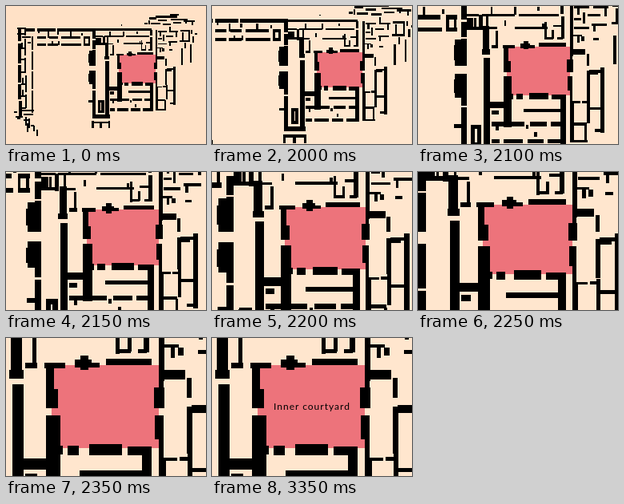
These frames come from a looping animation (250x173 px, 5350 ms). An HTML page:

```html
<!DOCTYPE html>
<html lang="en">
<head>
<meta charset="utf-8">
<title>Palace plan</title>
<style>
  @property --k { syntax: "<number>"; inherits: true; initial-value: 0; }
  @property --dx { syntax: "<length>"; inherits: true; initial-value: 0px; }

  html, body { margin: 0; width: 100%; height: 100%; overflow: hidden; }
  svg {
    display: block; width: 100vw; height: 100vh;
    background: #ffe6ce;
    animation: zoom 5350ms infinite step-end;
  }
  /* k counts the eight equal zoom steps */
  .plan {
    transform:
      translate(calc(var(--k) * -43.9px + var(--dx)), calc(var(--k) * -18px))
      scale(calc(1 + var(--k) * .24));
  }
  .walls { fill: none; stroke: #000; }
  .label {
    font: 12px Lato, "Open Sans", sans-serif;
    letter-spacing: 1px;
    animation: label 5350ms infinite step-end;
  }
  @keyframes zoom {
    0% { --k: 0; --dx: 0px; background: #ffe1c6; }
    37.383% { --k: 1; --dx: 0px; background: #ffe6ce; animation-timing-function: steps(7); }
    43.924% { --k: 8; --dx: 0px; background: #ffe6ce; animation-timing-function: step-end; }
    43.925%, 100% { --k: 8; --dx: -4px; background: #ffe6ce; }
  }
  @keyframes label {
    0% { visibility: hidden; }
    62.616%, 100% { visibility: visible; }
  }
</style>
</head>
<body>
<svg viewBox="0 0 250 173" preserveAspectRatio="none">
  <g class="plan" shape-rendering="crispEdges">

    <!-- west wing -->
    <g class="walls">
      <path stroke-width="4" d="M17 27V44M17 47V72M17 74V96M17 98V117M17.500 119V138"/>
      <path stroke-width="2" d="M14 28H25M14 35H24M24 29V37M24 41V62M24 65V84M25 87V108M25 111V128
        M33 38V55M33 57V80M33 82V104M33 106V134M20 39H31M19 53H24M19 67H24M19 83H25M19 98H25M19 113H25
        M19 128H25M27 46H31M20 46V53M21 90V98M21 105V113"/>
      <path stroke-width="2" d="M10 133H14M12 139H21M19 131H35M22 136H34M25 139V150M22 143H30M29 141V153
        M27 147V158M31 150H35M35 150V157M39 155V163M14 141H18"/>
    </g>

    <!-- north rooms -->
    <g class="walls">
      <path stroke-width="4" d="M23 29.500H36M39 29.500H62M64 29.500H112"/>
      <path stroke-width="3" d="M112 29.500H182"/>
      <path stroke-width="3" d="M39 39.500H50M54 39.500H65M69 39.500H93M97 39.500H105
        M39 48.500H50M52 48.500H65M69 48.500H94M97 48.500H105"/>
      <path stroke-width="2" d="M41 31V34M53 32V40M65 32V36M66 44V49M81 32V38M95 34V37M98 39V49M103.500 39V49M58 44V48"/>
      <path stroke-width="1.600" d="M112 38H121M123 38H147M150 38H179M130 32V37M147 32V38M164 32V35
        M118 40V48M113 40V47M127 39V56M127 47.500H134M147 47.200H171M140 42V46
        M169.500 43V56M174.500 49V55M169 55H175M167.500 44V47M175 46H181M178 55H182"/>
      <path stroke-width="2.400" d="M181.400 30V37M181.600 39V55.500M109 47.500H122"/>
      <path fill="#000" stroke="none" d="M143.500 23h1.500v1.500h-1.500z"/>
    </g>

    <!-- long corridor and stair block -->
    <g class="walls">
      <path stroke-width="4" d="M110 31V41M110 43V54M110 55V75M110 81V104M110 105.500V140"/>
      <path stroke-width="8.500" d="M107.750 56V75M107.750 81V98"/>
      <path stroke-width="3" d="M104 60V71M104 85V95M103 119H112M115 40V48M122 38V49"/>
      <path stroke-width="5" d="M108 138.500H130"/>
      <path stroke-width="3.200" d="M115 119.600H122.500M116.500 119V134M121 119V134M115 132.500H122.500"/>
      <path stroke-width="2.500" d="M108.500 144V153M118.500 146V153M129 144V153M108 146H130"/>
    </g>

    <!-- south rooms -->
    <g class="walls">
      <path stroke-width="3.200" d="M130 109H135M130 117.300H154M158 117.300H170M173 117.300H181
        M130 130H136M139 130H153M156 130H168M171 130H183"/>
      <path stroke-width="2" d="M156 118V121M134 118V122M162 123V127"/>
    </g>

    <!-- east rooms -->
    <g class="walls">
      <path stroke-width="3.200" d="M210.500 76V124"/>
      <path stroke-width="2" d="M200.500 99V117M201 79H211M200 106H210M188 117.500H199M198.500 118V131
        M190 130H200M205 122H212"/>
    </g>

    <!-- north-east quarter -->
    <g class="walls">
      <path stroke-width="3" d="M187 13.500H214M179 15.500H188"/>
      <path stroke-width="2" d="M205 11H216M173 21.500H177M179 18V23M181 22H193M196 23H206M209 21H219
        M222 19H236M190 18H201M206 17H227M225 16V22M233 20V24"/>
      <path stroke-width="1.800" d="M190 32H201M204 32H215M218 31H230M193 33V38M197 36V44
        M205 26V32M213 33V39M221 33V43M229 31V45M190 41H195M200 38H209M203 45H214M217 44H228M190 47.500H201M205 45V50"/>
      <path stroke-width="2" d="M219.500 53V74M230.500 48V71M224 46V53M234 38V46M232 30V35M236 35H239"/>
    </g>

    <!-- courtyard, drawn at full zoom size -->
    <g transform="scale(.3424658) translate(355 144)">
      <path fill="#ed737b" d="M59 34H191V138H59V97H57V88H59Z"/>
      <!-- north side -->
      <path d="M48 31h26v7h-26zM86 27h21v10h-21zM93 22h10v18h-10zM107 31h10v6h-10zM125 26h57v8h-57z
        M24 31h15v7h-15zM33 0h5v31h-5z"/>
      <!-- west side and corridor -->
      <path d="M50 36h10v52h-10zM50 64h15v24h-15zM50 97h18v108h-18z
        M6 -10h14v61h-14zM4 40h18v11h-18zM8 58h14v207h-14zM8 151h60v14h-60z"/>
      <!-- south side -->
      <path d="M68 135h3v11h-3zM77 135h14v12h-14zM104 133h41v14h-41zM152 136h30v11h-30z
        M170 140h12v101h-12zM92 166h90v8h-90z"/>
      <!-- east side -->
      <path d="M191 -56h7v110h-7zM191 54h6v34h-6zM185 62h13v26h-13zM186 97h11v30h-11zM191 127h6v23h-6zM191 150h9v88h-9z
        M197 40h27v12h-27zM226 50h6v25h-6zM226 86h7v59h-7zM232 86h18v8h-18z
        M198 8h18v4h-18zM206 12h5v13h-5zM215 12h7v10h-7zM240 15h12v5h-12z
        M197 150h17v4h-17zM217 149h11v5h-11zM228 163h5v22h-5z"/>
    </g>
  </g>
  <text class="label" x="77" y="90">Inner courtyard</text>
</svg>
</body>
</html>
```
